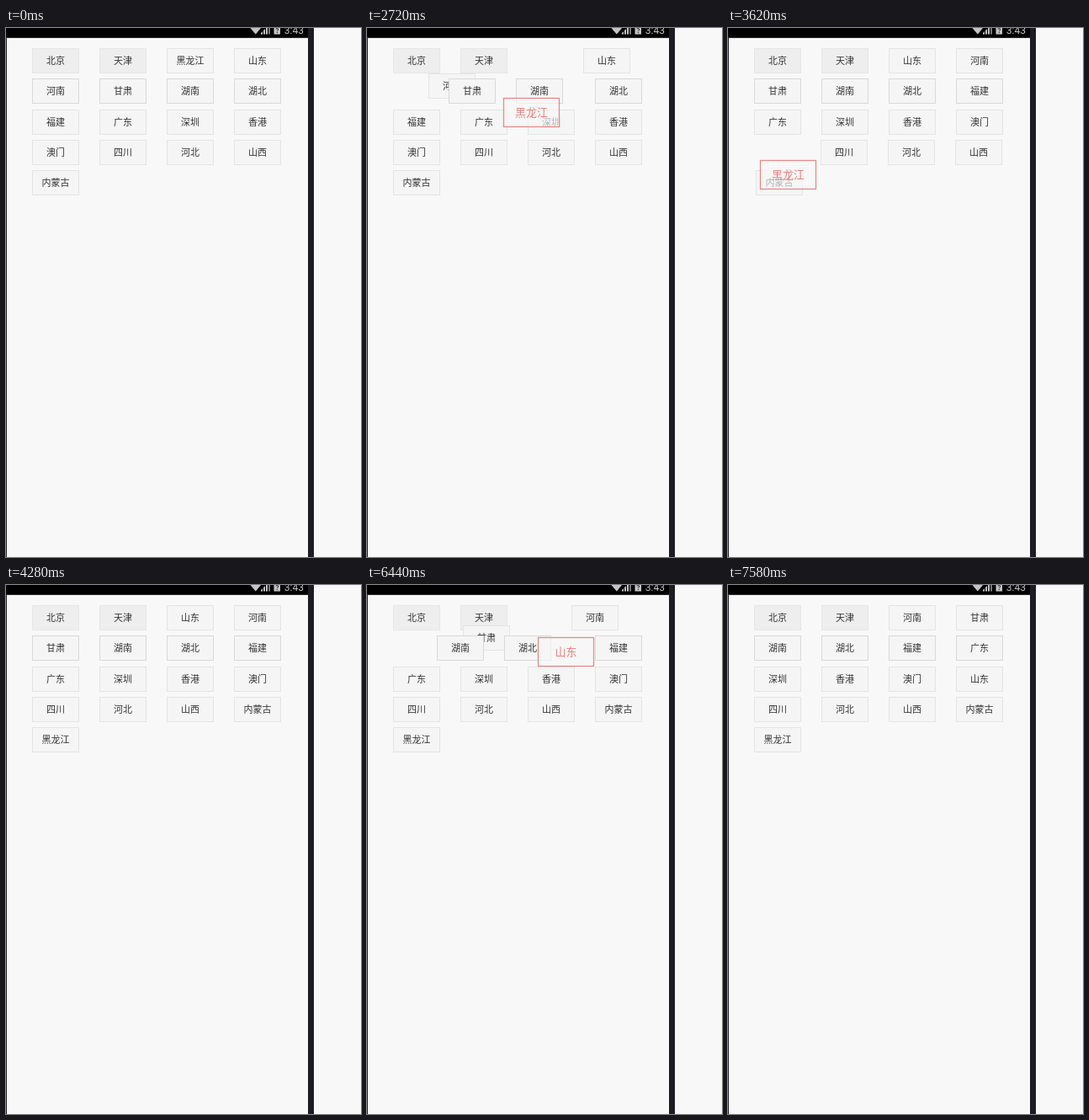
An HTML page that plays this animation: 422 px wide and 629 px high, repeating every 8000 ms.

```html
<!DOCTYPE html>
<html lang="zh-CN">
<head>
<meta charset="utf-8">
<title>Drag to reorder</title>
<style>
  html, body { margin: 0; width: 100%; height: 100%; overflow: hidden; background: #f8f8f8; }
  svg { display: block; }
  text { font-family: "Noto Sans CJK SC", "Noto Sans CJK", sans-serif; text-anchor: middle; }
  .cell rect { fill: #f5f5f5; stroke: #e4e4e4; }
  .cell.strong rect { stroke: #d9d9d9; }
  .cell.fixed rect { fill: #eee; stroke: #e6e6e6; }
  .cell text { font-size: 11px; fill: #333; }
  .cell.pressed text { fill: #b8b8b8; }
  #drag rect { fill: #f8f8f8; fill-opacity: .65; stroke: #e58a88; stroke-width: 1.3; }
  #drag text { font-size: 13px; fill: #e5807d; }
  #status text { font: 12px Roboto, sans-serif; fill: #c4c4c4; text-anchor: start; }
</style>
</head>
<body>
<svg width="422" height="629" viewBox="0 0 422 629">
  <rect width="1" height="629" fill="#26262a"/>
  <rect x="359" width="7" height="629" fill="#1d1c22"/>
  <g id="status" fill="#c4c4c4">
    <rect width="359" height="11" fill="#000"/>
    <rect y="11" width="359" height="1" fill="#333"/>
    <path d="M290.5 0H303L296.8 7.5Z"/>
    <path d="M303 7.5V6L305 4V7.5ZM306 7.5V3L308 1V7.5ZM309 7.5V0H311V7.5Z"/>
    <path d="M312 0H314V7.5H312Z" fill="#777"/>
    <rect x="318.5" y="-2" width="7.5" height="9.5"/>
    <path d="M320.8 1.2Q322.3 -.2 323.6 1.2Q323.6 2.6 322.3 3.6M322.3 4.8V6" fill="none" stroke="#111"/>
    <text x="330.8" y="6.7">3:43</text>
  </g>
  <g id="cells"></g>
  <g id="drag"><rect x=".5" y=".5" width="66" height="34"/><text x="33.5" y="22.2"></text></g>
</svg>
<script>
const LOOP = 8000, STEP = 60, OFFSET = 20, SLIDE = 350, TAP = 120;
const names = '北京 天津 黑龙江 山东 河南 甘肃 湖南 湖北 福建 广东 深圳 香港 澳门 四川 河北 山西 内蒙古'.split(' ');

// The card is pulled from point to point; reaching one with a slot makes the others give way.
const drags = [
  { item: names.indexOf('黑龙江'), press: 1700, lift: 2180, drop: 3980, path: [
    { t: 2240, x: 188, y: 24 },
    { t: 2624, x: 175, y: 55, slot: 6 },
    { t: 2840, x: 110, y: 196 },
    { t: 3100, x: 37, y: 140, slot: 12 },
    { t: 3600, x: 38, y: 157, slot: 16 },
    { t: 3920, x: 36, y: 162 }] },
  { item: names.indexOf('山东'), press: 5180, lift: 5660, drop: 7580, path: [
    { t: 5900, x: 194, y: 28 },
    { t: 6300, x: 197, y: 60, slot: 6 },
    { t: 6798, x: 270, y: 89, slot: 11 },
    { t: 7220, x: 275, y: 97 }] }
];
const taps = [500, 4160].map(t => ({ item: drags[0].item, press: t, lift: t + TAP }));
const presses = [...taps, ...drags];
const hops = drags.flatMap(d => d.path.filter(p => p.slot).map(p => ({ ...p, item: d.item })));

const mix = (a, b, k) => a + (b - a) * k;
const mixPoint = (a, b, k) => ({ x: mix(a.x, b.x, k), y: mix(a.y, b.y, k) });
const rowY = row => 24 + row * 36.25;
const slotPoint = s => ({ x: 31 + s % 4 * 80, y: rowY(Math.floor(s / 4)) });
const ease = k => (1 - Math.cos(Math.PI * Math.min(1, k))) / 2;
const place = (el, { x, y }) => el.setAttribute('transform', `translate(${Math.round(x)} ${Math.round(y)})`);

function add(parent, tag, attrs) {
  const el = document.createElementNS('http://www.w3.org/2000/svg', tag);
  for (const key in attrs) el.setAttribute(key, attrs[key]);
  return parent.appendChild(el);
}

const cells = names.map((name, i) => {
  const g = add(document.getElementById('cells'), 'g', { class: i < 2 ? 'cell fixed' : 'cell' });
  add(g, 'rect', { x: .5, y: .5, width: 55, height: 29 });
  add(g, 'text', { x: 28, y: 19 }).textContent = name;
  return g;
});
const dragView = document.getElementById('drag');
const dragText = dragView.querySelector('text');

// Grid position of every item once the hops begun by time t are applied.
function layout(t) {
  let order = names.map((_, i) => i);
  let spots = order.map(slotPoint);
  for (const hop of hops.filter(h => h.t <= t)) {
    const next = order.filter(i => i !== hop.item);
    next.splice(hop.slot, 0, hop.item);
    const k = ease((t - hop.t) / SLIDE);
    spots = names.map((_, i) => mixPoint(slotPoint(order.indexOf(i)), slotPoint(next.indexOf(i)), k));
    order = next;
  }
  return spots;
}

// Each pull starts slowly and speeds up.
function along(path, t) {
  const i = path.findIndex(p => p.t > t);
  if (i < 0) return path[path.length - 1];
  const [a, b] = [path[i - 1], path[i]];
  return mixPoint(a, b, ((t - a.t) / (b.t - a.t)) ** 2);
}

function draw(t) {
  const drag = drags.find(d => t >= d.lift && t < d.drop);
  layout(t).forEach((spot, i) => {
    const cell = cells[i];
    place(cell, spot);
    cell.style.display = drag && drag.item === i ? 'none' : '';
    cell.classList.toggle('strong', Math.abs(spot.y - rowY(1)) < 1);
    cell.classList.toggle('pressed', presses.some(p => p.item === i && t >= p.press && t < p.lift));
  });
  const moving = drag && t >= drag.path[0].t;
  dragView.style.display = moving ? '' : 'none';
  if (moving) {
    place(dragView, along(drag.path, t));
    dragText.textContent = names[drag.item];
  }
}

const origin = performance.now();
function tick() {
  const t = (performance.now() - origin) % LOOP;
  draw(Math.max(0, Math.floor((t - OFFSET) / STEP) * STEP + OFFSET));
  requestAnimationFrame(tick);
}
tick();
</script>
</body>
</html>
```
